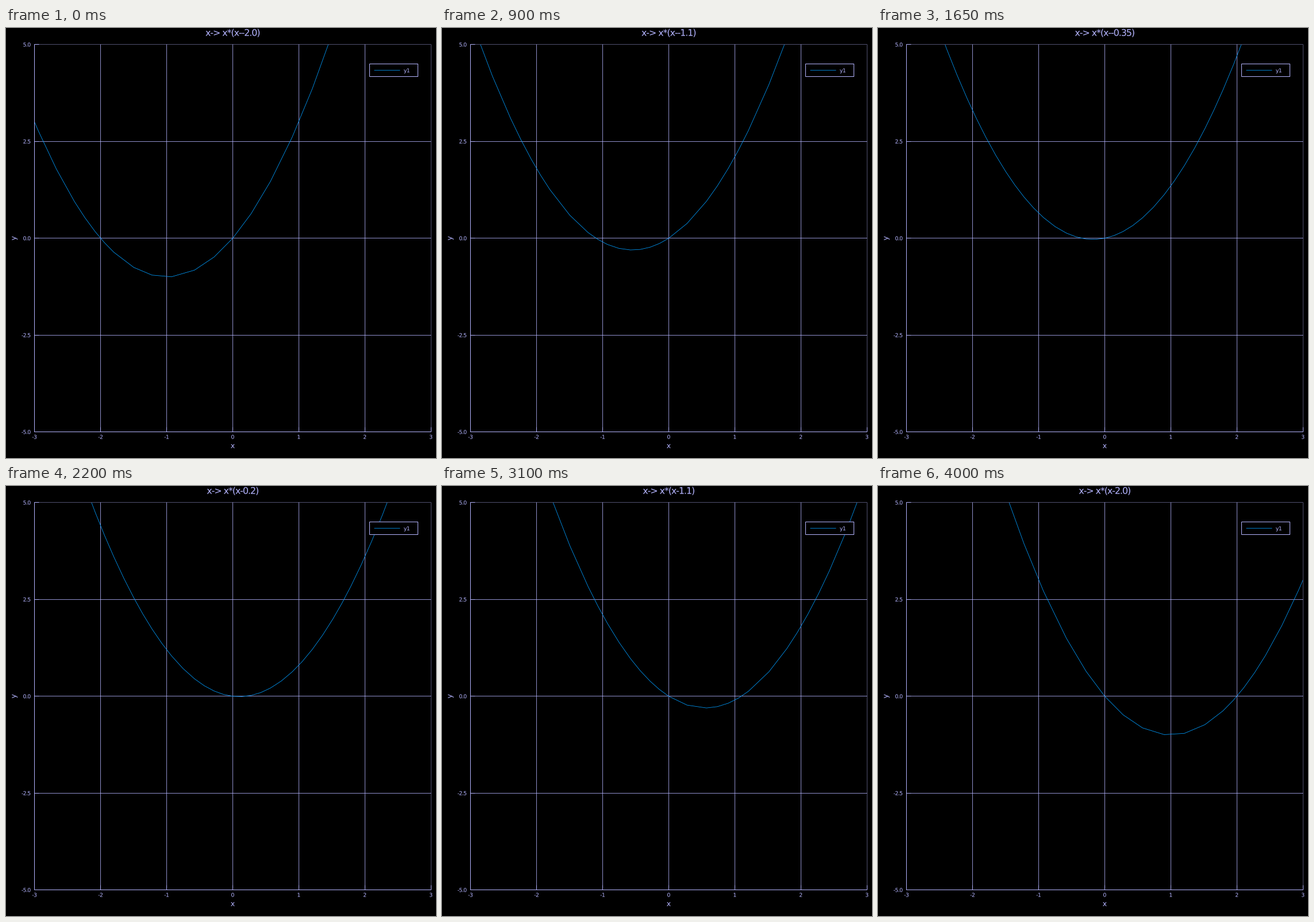
Recreate the animation shown at these times as a matplotlib script. Size 748x748 px, loop 4.05 s.

```python
import numpy as np
import matplotlib.pyplot as plt
from matplotlib.animation import FuncAnimation
from matplotlib.patches import PathPatch, Rectangle
from matplotlib.path import Path
from matplotlib.textpath import TextPath

SIZE, DPI = 748, 100
FRAMES, STEP_MS = 81, 50
FG, BLUE, DIM = "#b4b4ff", "#009afa", "#50506f"
LEFT, RIGHT, TOP, BOTTOM = 49.6, 739.2, 28.8, 702.7
MAX_CURVATURE = 0.05
TRACKING = -0.07  # letter spacing in em

# Slightly jittered starting grid for the adaptive sampler
NODES = np.array([-3, -2.942, -2.395, -2.08, -1.799, -1.498, -1.222, -0.927,
                  -0.579, -0.282, 0, 0.278, 0.571, 0.9, 1.205, 1.517, 1.789,
                  2.105, 2.432, 2.928, 3])

plt.rcParams["font.family"] = "DejaVu Sans"


def px(x):
    return LEFT + (x + 3) / 6 * (RIGHT - LEFT)


def py(y):
    return BOTTOM - (y + 5) / 10 * (BOTTOM - TOP)


def pt(pixels):
    return pixels * 72 / DPI


def curvature(xs, ys):
    """Smoothed relative bend of every three-point interval."""
    slope = np.diff(ys) / np.diff(xs)
    bend = np.zeros(len(xs))
    bend[1:-1] = 2 * np.abs(np.diff(slope)) * (xs[2:] - xs[:-2]) / np.ptp(ys)
    mid = np.arange(1, len(xs), 2)
    curv = bend[mid] / 2 + (bend[mid - 1] + bend[mid + 1]) / 4
    curv[0], curv[-1] = curv[1], curv[-2]
    return curv


def sample(f):
    """Split the most bent intervals until all are flat enough."""
    xs = NODES
    for _ in range(7):
        curv = curvature(xs, f(xs))
        order = np.argsort(curv, kind="stable")[-(len(curv) // 2):]
        chosen = [k for k in order if curv[k] > MAX_CURVATURE]
        if not chosen:
            break
        extra = [(xs[i] + xs[i + 1]) / 2 for k in chosen for i in (2 * k, 2 * k + 1)]
        xs = np.sort(np.append(xs, extra))
    return xs, f(xs)


def ink_width(s, size):
    return TextPath((0, 0), s, size=size).get_extents().width


def text_path(x, y, s, size, ha=0.5, upright=False):
    """Outline of tightly spaced text on the baseline (x, y)."""
    bars = ink_width("||", size)
    verts, codes, pen = [], [], 0
    for c in s:
        if c != " ":
            glyph = TextPath((pen, 0), c, size=size)
            verts.append(glyph.vertices)
            codes.append(glyph.codes)
        pen += ink_width(f"|{c}|", size) - bars + TRACKING * size
    u, v = np.concatenate(verts).T
    u = u - ha * (pen - TRACKING * size)
    pts = (x - v, y - u) if upright else (x + u, y - v)
    return Path(np.column_stack(pts), np.concatenate(codes))


fig = plt.figure(figsize=(SIZE / DPI, SIZE / DPI), dpi=DPI, facecolor="black")
ax = fig.add_axes([0, 0, 1, 1])
ax.set_xlim(0, SIZE)
ax.set_ylim(SIZE, 0)
ax.axis("off")


def line(x0, y0, x1, y1, color=FG, width=1.0, z=1):
    ax.plot(np.floor([x0, x1]), np.floor([y0, y1]), color=color, lw=pt(width),
            zorder=z, solid_capstyle="butt")


def label(*args, **kw):
    return ax.add_patch(PathPatch(text_path(*args, **kw), fc=FG, lw=0, zorder=6))


line(LEFT, TOP, RIGHT, TOP, DIM)
line(RIGHT, TOP, RIGHT, BOTTOM, DIM)
for x in range(-3, 4):
    if abs(x) < 3:
        line(px(x), TOP, px(x), BOTTOM, width=0.8)
    line(px(x), BOTTOM - 8, px(x), BOTTOM)
    label(px(x), 714.6, str(x), 9.4)
for y in np.arange(-5, 5.1, 2.5):
    if abs(y) < 5:
        line(LEFT, py(y), RIGHT, py(y), width=0.8)
    line(LEFT, py(y), LEFT + 8, py(y))
    label(43.2, py(y) + 3.5, f"{y:.1f}", 9.4, ha=1)
line(LEFT, TOP, LEFT, BOTTOM)
line(LEFT, BOTTOM, RIGHT, BOTTOM)

label(394.4, 730.8, "x", 12.6)
label(17.3, 365.7, "y", 12.6, upright=True)
title = label(394.7, 13.7, "x", 16)

curve, = ax.plot([], [], color=BLUE, lw=pt(0.8), zorder=3)
curve.set_clip_path(Rectangle((LEFT, TOP), RIGHT - LEFT, BOTTOM - TOP,
                              transform=ax.transData))

ax.add_patch(Rectangle((632, 62), 84, 22, fc="black", ec=FG, lw=pt(1), zorder=4))
line(640, 73, 685, 73, BLUE, 0.8, z=5)
label(691.8, 77.2, "y1", 9.4, ha=0)


def update(i):
    a = round(-2 + i * 0.05, 2) + 0.0
    xs, ys = sample(lambda x: x * (x - a))
    curve.set_data(px(xs), py(ys))
    title.set_path(text_path(394.7, 13.7, f"x-> x*(x-{a})", 16))
    return curve, title


anim = FuncAnimation(fig, update, frames=FRAMES, interval=STEP_MS,
                     repeat=True, repeat_delay=0, blit=False)
plt.show()
```
